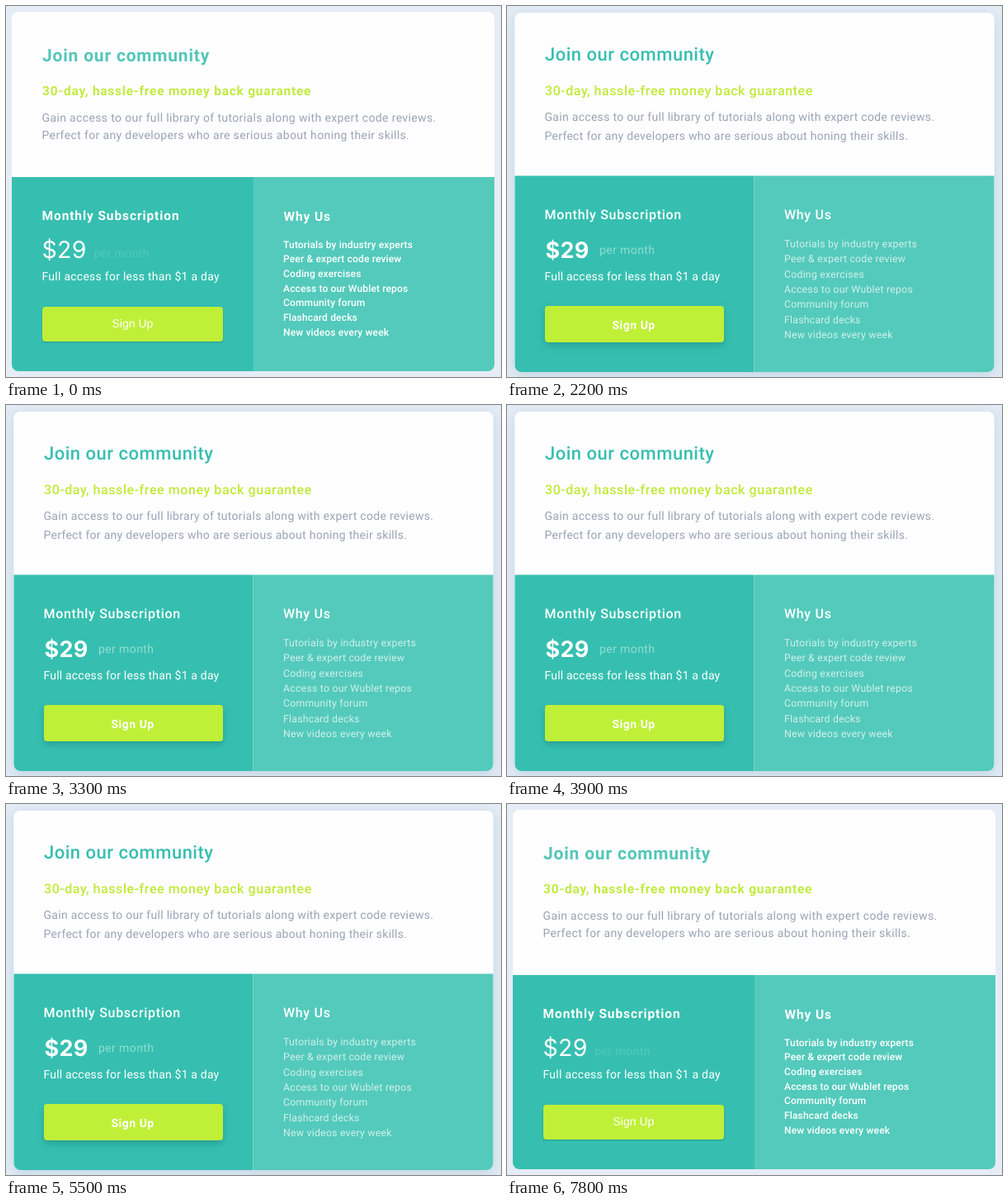
Write an HTML page that moves like this. It is 600x449 px and loops after 7.9 s.

```html
<!DOCTYPE html>
<html lang="en">
<head>
<meta charset="utf-8">
<title>Pricing card comparison</title>
<style>
  html, body { margin: 0; width: 100%; height: 100%; overflow: hidden; background: #e6ecf6; }
  svg { display: block; width: 600px; height: 449px; }
  text { font-family: Roboto, Inter, sans-serif; fill: #fff; text-rendering: geometricPrecision; white-space: pre; }

  .teal { fill: #36bfb0; }
  .mint { fill: #54cabc; }
  .lime { fill: #c0ef38; }
  .paper { fill: #fefdff; }
  .body { font-size: 14px; }
  .grey { fill: #9aa4b4; }
  .price { font-family: Inter, Roboto, sans-serif; }

  /* first version */
  .plain .title { font-size: 21px; font-weight: 700; letter-spacing: .8px; fill: #54c6b8; }
  .plain .offer { font-size: 15.5px; font-weight: 700; letter-spacing: .745px; fill: #c0eb40; }
  .plain .grey { letter-spacing: .365px; }
  .plain .head { font-size: 15.5px; font-weight: 700; letter-spacing: .9px; }
  .plain .price { font-size: 28.5px; letter-spacing: .3px; }
  .plain .per { letter-spacing: .4px; fill: #50cabc; }
  .plain .deal { letter-spacing: .26px; }
  .plain .list { font-size: 12px; font-weight: 500; letter-spacing: .15px; }
  .plain .sign { font: 14px "Liberation Sans", Arial, sans-serif; }
  .plain .button { filter: drop-shadow(0 1px 1px rgba(0, 70, 60, .28)); }

  /* second version, shown in turns over the first */
  .refined .title { font-size: 22px; font-weight: 500; letter-spacing: .5px; fill: #36bfb0; }
  .refined .offer { font-size: 16px; font-weight: 500; letter-spacing: .57px; fill: #c0ea38; }
  .refined .grey { letter-spacing: .295px; }
  .refined .head { font-size: 16px; font-weight: 500; letter-spacing: .7px; }
  .refined .price { font-size: 27px; font-weight: 700; letter-spacing: .3px; }
  .refined .per { letter-spacing: .4px; fill: #92dcd3; }
  .refined .deal { letter-spacing: .19px; }
  .refined .list { font-size: 12.3px; letter-spacing: .23px; fill: #d0f0eb; }
  .refined .sign { font-size: 14px; font-weight: 700; letter-spacing: .5px; }
  .refined .button { filter: drop-shadow(0 4px 4px rgba(0, 80, 70, .28)); }
  .refined .shadow { fill: #fff; filter: drop-shadow(0 4px 8px rgba(90, 150, 175, .28)); }

  .refined { opacity: 0; animation: swap 7900ms step-end infinite; }
  @keyframes swap {
    0%, 30.37%, 50.63%, 70.88%, 100% { opacity: 0; }
    20.25%, 40.5%, 60.75% { opacity: 1; }
  }
</style>
</head>
<body>
<svg viewBox="0 0 600 449">
  <defs>
    <clipPath id="plainCard"><rect x="7" y="7" width="585" height="435" rx="8"/></clipPath>
    <clipPath id="refinedCard"><rect x="9.5" y="8" width="581" height="435" rx="8"/></clipPath>
  </defs>

  <g class="plain">
    <g clip-path="url(#plainCard)">
      <rect class="paper" width="600" height="449"/>
      <rect class="teal" y="207" width="300" height="242"/>
      <rect class="mint" x="300" y="207" width="300" height="242"/>
    </g>
    <text class="title" x="44" y="66.5">Join our community</text>
    <text class="offer" x="44" y="108">30-day, hassle-free money back guarantee</text>
    <text class="body grey" x="43.5" y="140">Gain access to our full library of tutorials along with expert code reviews.</text>
    <text class="body grey" x="43.5" y="161">Perfect for any developers who are serious about honing their skills.</text>
    <text class="head" x="43.5" y="258.5">Monthly Subscription</text>
    <text class="price" x="43.5" y="304.5">$29</text>
    <text class="body per" x="106.5" y="304">per month</text>
    <text class="body deal" x="43.5" y="332">Full access for less than $1 a day</text>
    <rect class="lime button" x="44" y="364" width="219" height="42" rx="4"/>
    <text class="sign" x="128.5" y="389">Sign Up</text>
    <text class="head" x="336.5" y="259.5">Why Us</text>
    <text class="list" y="292.5">
      <tspan x="336">Tutorials by industry experts</tspan>
      <tspan x="336" dy="17.7">Peer &amp; expert code review</tspan>
      <tspan x="336" dy="17.7">Coding exercises</tspan>
      <tspan x="336" dy="17.7">Access to our Wublet repos</tspan>
      <tspan x="336" dy="17.7">Community forum</tspan>
      <tspan x="336" dy="17.7">Flashcard decks</tspan>
      <tspan x="336" dy="17.7">New videos every week</tspan>
    </text>
  </g>

  <g class="refined">
    <rect width="600" height="449" fill="#e4ecf5"/>
    <rect class="shadow" x="9.5" y="8" width="581" height="435" rx="8"/>
    <g clip-path="url(#refinedCard)">
      <rect class="paper" width="600" height="449"/>
      <rect class="teal" y="205.5" width="299.5" height="244"/>
      <rect class="mint" x="299.5" y="205.5" width="301" height="244"/>
    </g>
    <text class="title" x="46" y="66">Join our community</text>
    <text class="offer" x="46" y="108">30-day, hassle-free money back guarantee</text>
    <text class="body grey" x="45.5" y="138.5">Gain access to our full library of tutorials along with expert code reviews.</text>
    <text class="body grey" x="45.5" y="162">Perfect for any developers who are serious about honing their skills.</text>
    <text class="head" x="45.5" y="258">Monthly Subscription</text>
    <text class="price" x="46.5" y="305">$29</text>
    <text class="body per" x="112" y="300">per month</text>
    <text class="body deal" x="45.5" y="332">Full access for less than $1 a day</text>
    <rect class="lime button" x="46" y="363" width="217" height="44" rx="4"/>
    <text class="sign" x="127.5" y="391">Sign Up</text>
    <text class="head" x="336" y="258">Why Us</text>
    <text class="list" y="292">
      <tspan x="336">Tutorials by industry experts</tspan>
      <tspan x="336" dy="18.35">Peer &amp; expert code review</tspan>
      <tspan x="336" dy="18.35">Coding exercises</tspan>
      <tspan x="336" dy="18.35">Access to our Wublet repos</tspan>
      <tspan x="336" dy="18.35">Community forum</tspan>
      <tspan x="336" dy="18.35">Flashcard decks</tspan>
      <tspan x="336" dy="18.35">New videos every week</tspan>
    </text>
  </g>
</svg>
</body>
</html>
```
